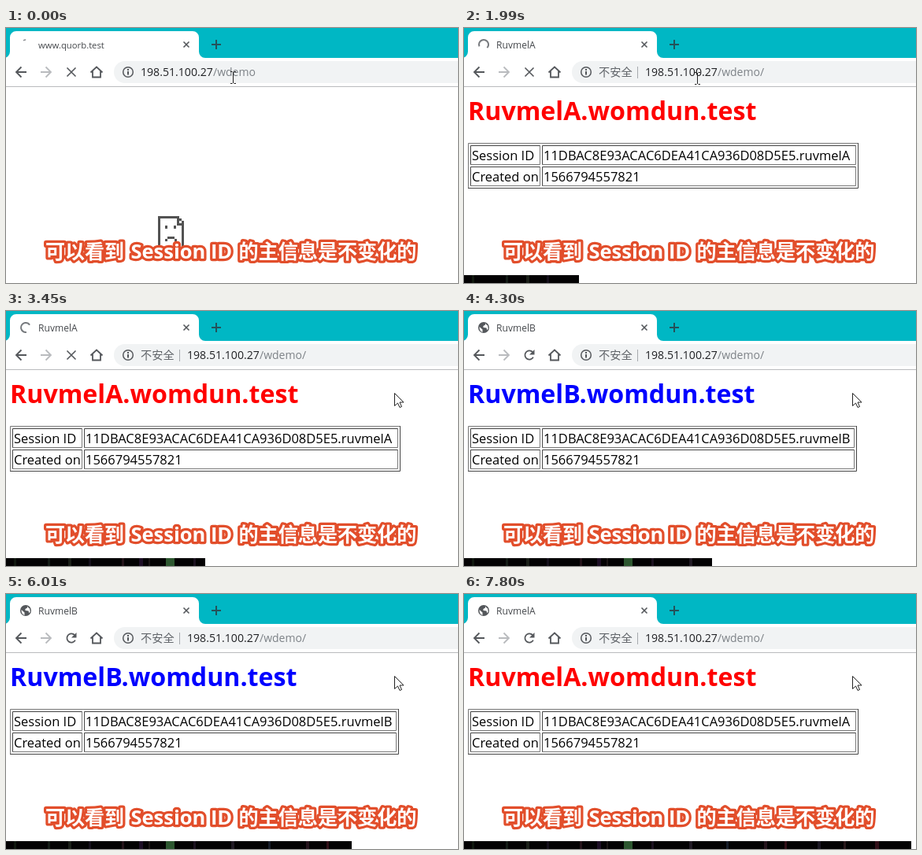
An HTML page with a canvas for the animation above (7880 ms loop, 574 by 324 pixels).

```html
<!DOCTYPE html>
<html lang="zh-CN">
<head>
<meta charset="utf-8">
<title>Session demo</title>
<style>
  html, body { margin: 0; width: 574px; height: 324px; overflow: hidden; background: #fff; }
  canvas { display: block; }
</style>
</head>
<body>
<canvas id="stage" width="574" height="324"></canvas>
<script>
const ctx = document.getElementById('stage').getContext('2d');
const W = 574, H = 324, LOOP = 7880, STEPS = 102;
const LATIN = '"Open Sans", "Noto Sans", sans-serif';
const CJK = '"Noto Sans CJK SC", "Noto Sans CJK", sans-serif';
const TEAL = '#00b7c4', ICON = '#54575b';

// Page A appears at the first time, then B and A take turns.
const SWITCHES = [420, 1230, 1960, 2580, 3440, 4000, 4520, 4880, 5420, 5900, 6560, 7050, 7560];
const LOAD_LEAD = 190, TITLE_LEAD = 90, LOAD_TAIL = 50;

// Time, x, y of the pointer.
const POINTER = [[0, 288, 63], [1700, 288, 63], [2450, 312, 65], [2800, 312, 65], [3250, 493, 104]];

// x, width, colour of the marks on the progress strip.
const MARKS = [[10, 3, '#10180f'], [53, 3, '#141c16'], [79, 4, '#1b2019'],
  [105, 3, '#15101c'], [147, 3, '#24141a'], [169, 5, '#1d0f26'], [181, 2, '#1c1616'],
  [203, 11, '#2d5730'], [238, 3, '#1c1220'], [286, 4, '#201a24'], [333, 3, '#171d2a'],
  [381, 4, '#25141d'], [407, 3, '#321019'], [449, 4, '#1b1723'], [482, 3, '#28171b'], [522, 5, '#321019']];

function box(x, y, w, h, color) {
  ctx.fillStyle = color;
  ctx.fillRect(x, y, w, h);
}

function text(str, x, y, size, color, weight = 400, family = LATIN) {
  ctx.font = `${weight} ${size}px ${family}`;
  ctx.fillStyle = color;
  ctx.fillText(str, x, y);
}

function line(d, color = ICON, width = 1.8) {
  ctx.strokeStyle = color;
  ctx.lineWidth = width;
  ctx.stroke(new Path2D(d));
}

function shape(d, color) {
  ctx.fillStyle = color;
  ctx.fill(new Path2D(d));
}

function arc(x, y, r, from, to, color = ICON, width = 1.8) {
  ctx.beginPath();
  ctx.arc(x, y, r, from, to);
  ctx.strokeStyle = color;
  ctx.lineWidth = width;
  ctx.stroke();
}

function globe() {
  shape('M18 21a7 7 0 1 0 14 0a7 7 0 1 0 -14 0', ICON);
  shape('M19.5 20l4 3.5v3.5q-4-1.500-4-7zM23 16l4-.5v2l-2.500 1.500v2l4 .5 1 3q2-3 .5-6l-2-1.500 -1-1.500z', '#fff');
}

function tabStrip(t, page, loading) {
  box(0, 0, W, 38, TEAL);
  shape('M-3 38A8 8 0 0 0 5 30V12A8 8 0 0 1 13 4H237A8 8 0 0 1 245 12V30A8 8 0 0 0 253 38Z', '#fff');
  if (!page) arc(25, 21, 6, 4.2 - t / 250, 4.75 - t / 250, '#8b8e92', 1.5);
  else if (loading) arc(25, 21, 6, t / 130, t / 130 + 4.3, '#777a7e', 2);
  else globe();
  if (page) text('Ruvmel' + page, 41, 25.5, 12.1, '#45484c');
  else text('www.quorb.test', 41, 25.5, 11.3, '#45484c');
  line('M225.500 17.500l7 7m0-7l-7 7', ICON, 1.6);
  line('M261 21h12m-6-6v12', '#24525a', 2);
}

function toolbar(page, loading) {
  box(0, 38, W, 36, '#fff');
  box(0, 74, W, 1, '#b9bbbd');
  line('M26 56H13.500M19.500 49.500L13 56l6.500 6.500');
  line('M44 56h12.500M50.500 49.500l6.500 6.500-6.500 6.500', '#b9bbbe');
  if (loading) {
    line('M77.500 50.500l11 11m0-11l-11 11', ICON, 1.6);
  } else {
    arc(83, 56, 5.6, 0.5, 5.5);
    shape('M89.500 49v6.500h-6.500z', ICON);
  }
  line('M107.500 56.500L115 49.500l7.500 7M110 55v7.500h10V55');

  shape('M574 42H151a14 14 0 0 0 0 28H574Z', '#f1f3f4');
  arc(155, 56, 6.3, 0, 7, ICON, 1.5);
  box(154, 55, 2, 4.5, ICON);
  box(154, 52, 2, 2, ICON);
  let x = 171;
  if (page) {
    text('不安全', 171, 61, 14.2, '#5f6368', 400, CJK);
    box(220, 49, 1, 15, '#a6a9ad');
    x = 230;
  }
  text('198.51.100.27', x, 61, 14.1, '#202124');
  text('/wdemo' + (page ? '/' : ''), x + 92, 61, 14, '#7d8287');
}

function errorPage() {
  const cells = [[193, 239, 25, 3], [193, 239, 3, 45], [223, 248, 3, 36], [193, 281, 33, 3],
    [217, 239, 3, 11], [217, 248, 9, 3], [220, 242, 3, 3], [223, 245, 3, 3],
    [202, 251, 3, 4], [213, 251, 3, 4], [205, 265, 9, 3], [202, 268, 3, 3], [214, 268, 3, 3]];
  for (const [x, y, w, h] of cells) box(x, y, w, h, '#535353');
}

function frame(x, y, right, bottom, light, dark) {
  line(`M${x + .5} ${bottom + .5}V${y + .5}H${right + .5}`, light, 1);
  line(`M${x} ${bottom + .5}H${right + .5}V${y}`, dark, 1);
}

function sessionPage(page) {
  const right = page === 'A' ? 500 : 498;
  text(`Ruvmel${page}.womdun.test`, 5, 117, 32.2, page === 'A' ? '#f00' : '#00f', 700);
  frame(5, 146, right, 203, '#777', '#444');
  const rows = [['Session ID', '11DBAC8E93ACAC6DEA41CA936D08D5E5.ruvmel' + page], ['Created on', '1566794557821']];
  rows.forEach(([name, value], i) => {
    const y = 149 + 27 * i;
    frame(8, y, 96, y + 24, '#444', '#777');
    frame(99, y, right - 3, y + 24, '#444', '#777');
    text(name, 10, y + 19, 16.5, '#000');
    text(value, 101, y + 19, 16.5, '#000');
  });
}

function caption() {
  const parts = [['可以看到', 50, 25, CJK], ['Session ID', 158.5, 25.5, LATIN], ['的主信息是不变化的', 295.5, 25.1, CJK]];
  ctx.lineJoin = 'round';
  ctx.strokeStyle = '#e24e2b';
  ctx.lineWidth = 6.4;
  for (const [str, x, size, family] of parts) {
    ctx.font = `700 ${size}px ${family}`;
    ctx.strokeText(str, x, 292.7);
  }
  for (const [str, x, size, family] of parts) text(str, x, 292.7, size, '#fff', 700, family);
  ctx.lineJoin = 'miter';
}

// The strip grows in equal steps.
function progress(t) {
  const width = Math.round(Math.round(t / LOOP * STEPS) * W / STEPS);
  ctx.save();
  ctx.beginPath();
  ctx.rect(0, 314, width, 10);
  ctx.clip();
  box(0, 314, W, 10, '#030203');
  for (const [x, w, color] of MARKS) box(x, 314, w, 10, color);
  ctx.restore();
}

function pointer(t) {
  let i = POINTER.findIndex(p => p[0] > t);
  if (i < 0) i = POINTER.length;
  const a = POINTER[i - 1], b = POINTER[i] || a;
  const k = b === a ? 0 : (t - a[0]) / (b[0] - a[0]);
  const ease = k * k * (3 - 2 * k);
  const x = Math.round(a[1] + (b[1] - a[1]) * ease);
  const y = Math.round(a[2] + (b[2] - a[2]) * ease);
  ctx.save();
  ctx.translate(x, y);
  if (y < 75) {
    line('M-3 -7.500h2.500m2 0h2.500M.5 -7V7M-3 7.500h2.500m2 0h2.500', '#222', 1);
  } else {
    const arrow = 'M.5 .5V16.500L4.500 13l2.500 5.500 2.500-1L7 12h5z';
    shape(arrow, '#fff');
    line(arrow, '#222', 1);
  }
  ctx.restore();
}

// Page shown at a time: '' before the first load, then A or B.
function pageAt(t) {
  const n = SWITCHES.filter(s => s <= t).length;
  return n ? 'BA'[n % 2] : '';
}

function draw(t) {
  const page = pageAt(t), title = pageAt(t + TITLE_LEAD);
  const loading = !page || SWITCHES.some(s => t > s - LOAD_LEAD && t < s + LOAD_TAIL);
  box(0, 0, W, H, '#fff');
  tabStrip(t, title, loading);
  toolbar(title, loading);
  if (page) sessionPage(page);
  else errorPage();
  progress(t);
  caption();
  pointer(t);
}

const start = performance.now();
function tick() {
  draw((performance.now() - start) % LOOP);
  requestAnimationFrame(tick);
}
tick();
</script>
</body>
</html>
```
